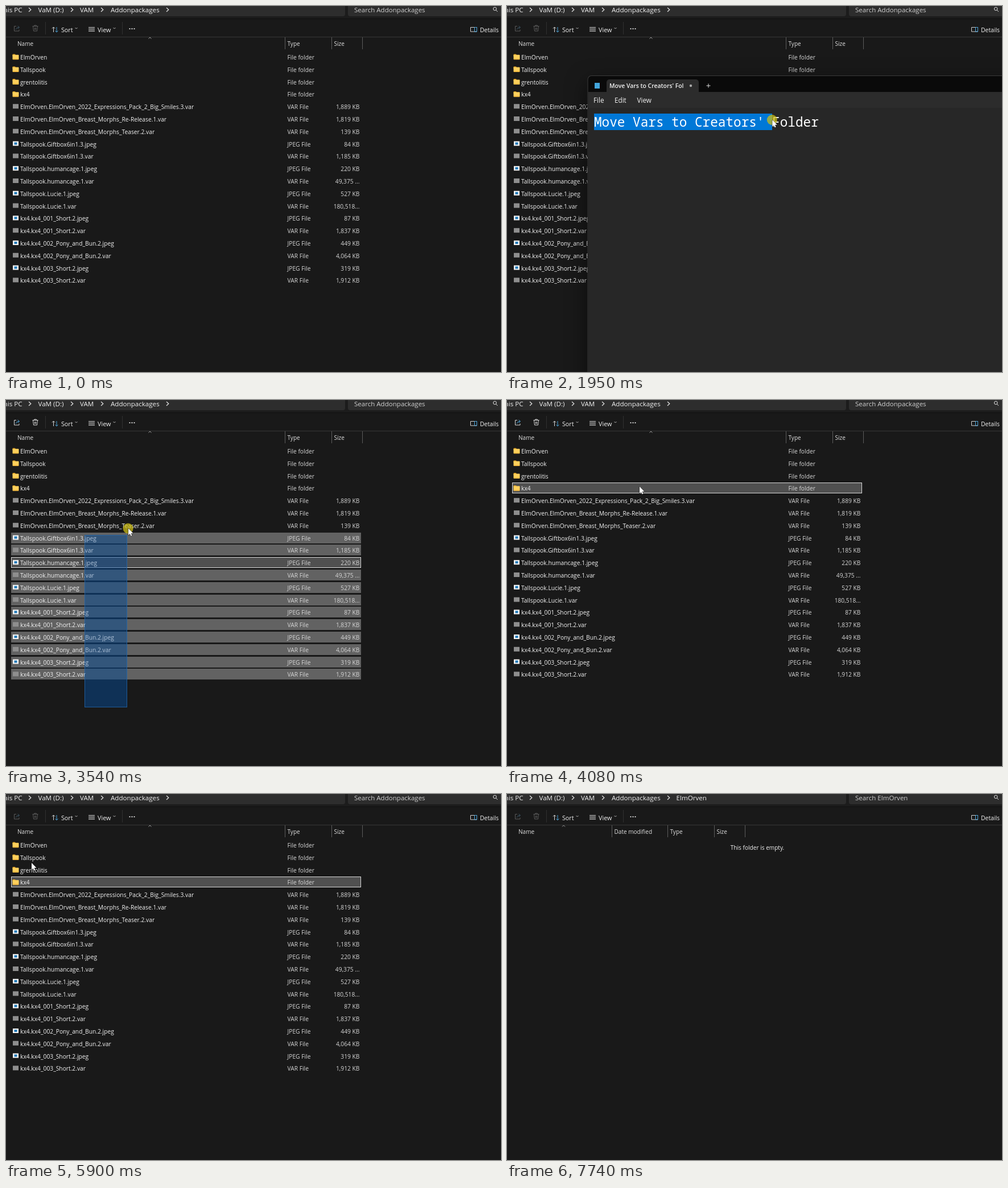
Recreate the animation shown at these times as an HTML page with a canvas. Size 870 px wide and 643 px high, loop 8000 ms.

```html
<!DOCTYPE html>
<html lang="en">
<head>
<meta charset="utf-8">
<title>Moving files to folders</title>
<style>
  html, body { margin: 0; width: 100%; height: 100%; overflow: hidden; background: #191919; }
  canvas { display: block; }
</style>
</head>
<body>
<canvas id="stage" width="870" height="643"></canvas>
<script>
const ctx = document.getElementById('stage').getContext('2d');
const LOOP = 8000;
const SANS = '"Open Sans", "Noto Sans", sans-serif';
const MONO = '"Noto Sans Mono", "DejaVu Sans Mono", monospace';

const FOLDERS = ['ElmOrven', 'Tallspook', 'grentolitis', 'kx4'];
const [ELM, TALL, , KX] = FOLDERS;
const FILES = [
  [`${ELM}.${ELM}_2022_Expressions_Pack_2_Big_Smiles.3.var`, '1,889 KB'],
  [`${ELM}.${ELM}_Breast_Morphs_Re-Release.1.var`, '1,819 KB'],
  [`${ELM}.${ELM}_Breast_Morphs_Teaser.2.var`, '139 KB'],
  [`${TALL}.Giftbox6in1.3.jpeg`, '84 KB'],
  [`${TALL}.Giftbox6in1.3.var`, '1,185 KB'],
  [`${TALL}.humancage.1.jpeg`, '220 KB'],
  [`${TALL}.humancage.1.var`, '49,375 ...'],
  [`${TALL}.Lucie.1.jpeg`, '527 KB'],
  [`${TALL}.Lucie.1.var`, '180,518...'],
  [`${KX}.${KX}_001_Short.2.jpeg`, '87 KB'],
  [`${KX}.${KX}_001_Short.2.var`, '1,837 KB'],
  [`${KX}.${KX}_002_Pony_and_Bun.2.jpeg`, '449 KB'],
  [`${KX}.${KX}_002_Pony_and_Bun.2.var`, '4,064 KB'],
  [`${KX}.${KX}_003_Short.2.jpeg`, '319 KB'],
  [`${KX}.${KX}_003_Short.2.var`, '1,912 KB'],
];
const ROWS = [...FOLDERS.map(name => [name, '']), ...FILES];
const FOCUSED_FILE = 9;
const ROW_HEIGHT = 19;
const rowY = i => 90 + 21.8 * i;
const rowTop = i => Math.round(rowY(i) - 10);

// Which page the file manager shows: start time, page, folder
const PAGES = [
  [0, 'list'], [4630, 'working', KX], [4750, 'empty', KX], [5370, 'working', KX],
  [5440, 'list'], [6180, 'working', TALL], [6320, 'empty', TALL], [6920, 'working', TALL],
  [6990, 'list'], [7420, 'working', ELM], [7530, 'empty', ELM],
];
// Single selected row: start, end, row index
const PICKED = [[3960, 4630, 3], [5440, 6060, 3], [6060, 6180, 1], [6990, 7200, 1], [7200, 7420, 0]];
const PRESSES = [[1380, 2280], [2980, 3740], [3960, 4060], [4360, 4450], [4520, 4610],
  [6060, 6120], [6140, 6180], [7200, 7270], [7320, 7400]];
// Pointer path: time, x, y
const PATH = [
  [0, 420, 690], [900, 420, 690], [1280, 174, 200], [1350, 174, 200], [1420, 294, 200],
  [1560, 330, 200], [1950, 466, 200], [2200, 545, 200], [2350, 520, 246], [2420, 520, 246],
  [2560, 420, 660], [2700, 340, 660], [2840, 138, 540], [2980, 138, 540], [3540, 215, 226],
  [3680, 228, 172], [3810, 228, 172], [3950, 233, 152], [4630, 233, 152], [4830, -20, 60],
  [5440, -20, 60], [5630, 45, 121], [5900, 45, 121], [6040, 45, 112], [6180, 45, 112],
  [6390, -20, 60], [6990, -20, 60], [7150, 45, 91], [7400, 45, 91], [7600, -20, 70], [LOOP, -20, 70],
];
const BAND = { start: 2980, end: 3740, x: 138, y: 540, lag: 20 };

const within = (t, [from, to]) => t >= from && t < to;
const clamp01 = v => Math.min(1, Math.max(0, v));
const lerp = (a, b, p) => a + (b - a) * p;

function pointerAt(t) {
  const i = Math.max(1, PATH.findIndex(key => key[0] > t));
  const [t0, x0, y0] = PATH[i - 1], [t1, x1, y1] = PATH[i];
  const p = clamp01((t - t0) / (t1 - t0));
  return { x: lerp(x0, x1, p), y: lerp(y0, y1, p) };
}

function bandCorner(t) {
  const { x, y } = pointerAt(Math.max(BAND.start, Math.min(t, BAND.end) - BAND.lag));
  return { x: Math.round(x + 1), y: Math.round(y) };
}

function text(str, x, y, { size = 10.25, color = '#f2f2f2', align = 'left', weight = 400, family = SANS } = {}) {
  ctx.font = `${weight} ${size}px ${family}`;
  ctx.fillStyle = color;
  ctx.textAlign = align;
  ctx.fillText(str, x, y);
}

function rect(x, y, w, h, color) {
  ctx.fillStyle = color;
  ctx.fillRect(x, y, w, h);
}

function round(x, y, w, h, radii, color) {
  ctx.fillStyle = color;
  ctx.beginPath();
  ctx.roundRect(x, y, w, h, radii);
  ctx.fill();
}

function outline(x, y, w, h, color) {
  ctx.strokeStyle = color;
  ctx.lineWidth = 1;
  ctx.strokeRect(x + .5, y + .5, w - 1, h - 1);
}

function disc(x, y, r, color) {
  ctx.fillStyle = color;
  ctx.beginPath();
  ctx.arc(x, y, r, 0, 7);
  ctx.fill();
}

function stroke(d, x, y, color, width = 1) {
  ctx.save();
  ctx.translate(x, y);
  ctx.strokeStyle = color;
  ctx.lineWidth = width;
  ctx.stroke(new Path2D(d));
  ctx.restore();
}

function drawAddressBar(folder) {
  rect(0, 0, 870, 23, '#1c1c1c');
  round(-10, -10, 606, 28, 4, '#2d2d2d');
  round(601, -10, 290, 28, 4, '#2d2d2d');
  rect(0, 22, 870, 1, '#101010');
  const crumb = { size: 11.6 };
  text('This PC', 28.5, 11, { ...crumb, align: 'right' });
  text('VaM (D:)', 56.5, 11, crumb);
  text('VAM', 130, 11, crumb);
  text('Addonpackages', 184, 11, crumb);
  if (folder) text(folder, 297.5, 11, crumb);
  for (const x of [42, 116, 169, 284]) stroke('M-2 -3.5L1.8 0L-2 3.5', x, 6.5, '#e4e4e4', 1.2);
  text('Search ' + (folder || 'Addonpackages'), 612, 11, { size: 11.55, color: '#cfcfcf' });
  stroke('M2 -1A2.8 2.8 0 1 1 -3.6 -1A2.8 2.8 0 1 1 2 -1M1.2 1.2L4 4', 860, 6, '#dddddd');
}

function drawToolbar(active) {
  const blue = active ? '#4ba3d8' : '#3c5361';
  const gray = active ? '#d8d8d8' : '#5a5a5a';
  stroke('M-1 -4H-4.5V4.5H4V2', 19, 39.5, gray);
  stroke('M-2 2Q-1 -2 4 -2M1.5 -4.5L4.5 -2L1.5 .5', 19, 39.5, blue);
  stroke('M-5 -3.5H5M-1.8 -3.5V-5H1.8V-3.5M-4 -3.5L-3 5H3L4 -3.5M-1 -1V3M1 -1V3', 51.5, 39, gray);
  for (const x of [69, 204]) rect(x, 28, 1, 22, '#303030');
  stroke('M-2.5 5V-4M-5 -1.5L-2.5 -4L0 -1.5', 86, 41, '#d8d8d8');
  stroke('M3 -4V5M.5 2.5L3 5L5.5 2.5', 86, 41, '#4ba3d8');
  text('Sort', 97, 45.5, { size: 10.7 });
  for (let i = 0; i < 4; i++) rect(145, 37 + i * 2.3, 11, 1, '#c8c8c8');
  text('View', 161, 45.5, { size: 10.8 });
  for (const x of [123.5, 190.5]) stroke('M-2 -1L0 1L2 -1', x, 39, '#b8b8b8');
  for (const x of [217.5, 221.5, 225.5]) disc(x, 40, 1.1, '#f0f0f0');
  stroke('M-5.5 -3.5H5.5V4H-5.5Z', 822, 41, '#d0d0d0');
  stroke('M1.5 -3.5H5.5V4H1.5Z', 822, 41, '#4ba3d8');
  text('Details', 833, 45.5, { size: 10.4 });
  rect(0, 54, 870, 1, '#363636');
}

function drawHeader(empty) {
  const columns = empty
    ? [['Date modified', 184], ['Type', 282], ['Size', 364], ['', 418]]
    : [['Type', 490], ['Size', 572], ['', 626]];
  const style = { size: 10.05, color: '#dedede' };
  text('Name', 20, 69.5, style);
  for (const [label, x] of columns) {
    rect(x, 55, 1, 21, '#5c5c5c');
    text(label, x + 4.5, 69.5, style);
  }
  stroke('M-2.5 1.5L0 -1L2.5 1.5', empty ? 99.5 : 253, 56, '#a0a0a0');
}

function drawIcon(name, y) {
  if (name.endsWith('.var')) {
    rect(12, y - 5, 10, 8, '#8e8e8e');
  } else if (name.endsWith('.jpeg')) {
    rect(12, y - 5, 10, 8, '#f4f4f4');
    rect(14.5, y - 3, 5, 4, '#1c78b8');
  } else {
    round(11.5, y - 5.5, 5, 4, 1, '#d99a1e');
    round(11.5, y - 4.2, 11, 8.5, 1, '#ffd05c');
    rect(12, y + 2.8, 10, 1, '#e9a92c');
  }
}

function drawRowBack(i, focused) {
  rect(9, rowTop(i), 615, ROW_HEIGHT, focused ? '#505050' : '#626262');
  if (focused) outline(9, rowTop(i), 615, ROW_HEIGHT, '#d8d8d8');
}

function drawSelection(t) {
  const picked = PICKED.find(span => within(t, span));
  if (picked) drawRowBack(picked[2], true);
  if (!within(t, [BAND.start, PICKED[0][0]])) return;
  const { y } = bandCorner(t);
  ROWS.forEach((row, i) => {
    if (rowTop(i) + ROW_HEIGHT > y && rowTop(i) < BAND.y) drawRowBack(i, i === FOCUSED_FILE);
  });
}

function drawBand(t) {
  if (!within(t, [BAND.start, BAND.end])) return;
  const { x, y } = bandCorner(t);
  const area = [BAND.x, y, x - BAND.x, BAND.y - y];
  rect(...area, 'rgba(5,75,150,.29)');
  outline(...area, 'rgba(40,110,180,.5)');
}

function drawList(t) {
  drawSelection(t);
  // The band lies partly below and partly above the text, which is tinted only lightly
  drawBand(t);
  ROWS.forEach(([name, size], i) => {
    const y = rowY(i);
    drawIcon(name, y);
    const ext = name.split('.').pop();
    const type = size ? ext.toUpperCase() + ' File' : 'File folder';
    text(name, 25, y + 4);
    text(type, 494.5, y + 4, { color: '#d6d6d6' });
    text(size, 621.5, y + 4, { color: '#d6d6d6', align: 'right' });
  });
  drawBand(t);
}

function drawExplorer(t) {
  const [, page, folder] = PAGES.findLast(entry => entry[0] <= t);
  rect(0, 0, 870, 643, '#191919');
  drawAddressBar(folder);
  drawToolbar(within(t, [BAND.start, 4630]));
  drawHeader(page === 'empty');
  if (page === 'list') drawList(t);
  else text(page === 'empty' ? 'This folder is empty.' : 'Working on it...', 440, 97.5,
    { size: 10.1, align: 'center' });
}

function drawNotepad(t) {
  const opening = clamp01((t - 610) / 240), closing = clamp01((t - 2560) / 220);
  const shown = (1 - (1 - opening) ** 3) * (1 - closing ** 2);
  if (!shown) return;
  const scale = lerp(.5, 1, shown);
  ctx.save();
  ctx.globalAlpha = shown;
  ctx.translate(lerp(90, 142, shown), lerp(520, 122, shown));
  ctx.scale(scale, scale);
  ctx.translate(-142, -122);

  ctx.shadowColor = 'rgba(0,0,0,.55)';
  ctx.shadowBlur = 36;
  ctx.shadowOffsetY = 12;
  round(141.5, 122, 1000, 800, 7, '#3b3b3b');
  ctx.shadowColor = 'transparent';
  round(142.5, 123, 998, 798, 6, '#0a0a0a');
  round(175, 129, 162, 24, [5, 5, 0, 0], '#2c2c2c');
  rect(142.5, 151, 998, 28, '#2c2c2c');
  rect(142.5, 179, 998, 742, '#272727');
  rect(154, 135, 9, 10, '#42a5dc');
  text("Move Vars to Creators' Fol", 180, 144, { size: 10.4, weight: 600 });
  disc(323, 140, 2.2, '#a8a8a8');
  stroke('M-3.5 0H3.5M0 -3.5V3.5', 354, 140, '#e0e0e0');
  text('File', 152, 169.5, { size: 11.7 });
  text('Edit', 189, 169.5, { size: 11.7 });
  text('View', 228.5, 169.5, { size: 11.7 });

  const charWidth = 13.63;
  if (within(t, PRESSES[0])) {
    const chars = Math.min(29, Math.round((pointerAt(t).x - 153) / charWidth));
    rect(153, 189, Math.round(chars * charWidth), 29, '#0078d7');
  }
  text("Move Vars to Creators' Folder", 153, 211.5, { size: 22.7, family: MONO, color: '#ffffff' });
  ctx.restore();
}

function drawPointer(t) {
  const { x, y } = pointerAt(t);
  if (PRESSES.some(span => within(t, span))) disc(x - .5, y, 9, 'rgba(205,190,20,.73)');
  ctx.save();
  ctx.translate(x, y);
  const arrow = new Path2D('M0 0V12L2.7 9.5L4.5 13.5L6.4 12.6L4.7 8.7H8.5Z');
  ctx.fillStyle = '#ffffff';
  ctx.strokeStyle = '#111111';
  ctx.lineWidth = 1;
  ctx.stroke(arrow);
  ctx.fill(arrow);
  ctx.restore();
}

function frame(now) {
  const t = now % LOOP;
  drawExplorer(t);
  drawNotepad(t);
  drawPointer(t);
  requestAnimationFrame(frame);
}
requestAnimationFrame(frame);
</script>
</body>
</html>
```
